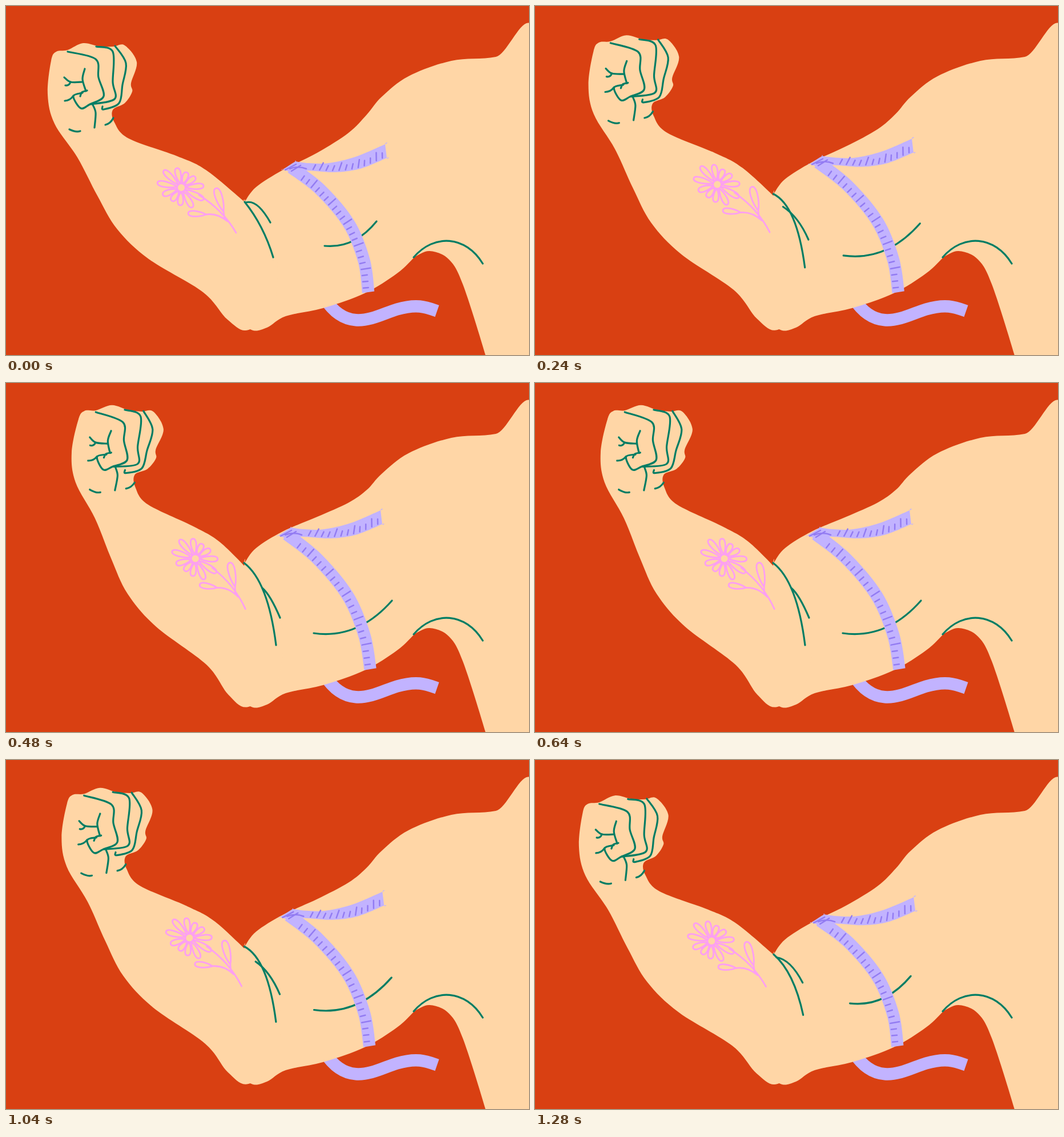
An HTML page that plays this animation: 916x611 px, repeating every 1360 ms.

```html
<!DOCTYPE html>
<html lang="en">
<head>
<meta charset="utf-8">
<title>Flexing arm</title>
<style>
  html, body { margin: 0; width: 100%; height: 100%; overflow: hidden; background: #d94012; }
  svg { display: block; width: 100%; height: 100%; }
  path, circle { fill: none; stroke-linecap: round; stroke-linejoin: round; }
  .skin { fill: #ffd6a6; }
  .tape { fill: #c2b3ff; }
  .strap { stroke: #c2b3ff; stroke-width: 21.5; stroke-linecap: butt; }
  .line { stroke: #007d64; stroke-width: 3.2; }
  .ink { stroke: #fc9ff2; stroke-width: 2.8; }
  .tick { stroke: #937cf2; stroke-width: 2.5; }
</style>
</head>
<body>
<svg id="stage" viewBox="0 0 916 611"></svg>
<script>
const stage = document.getElementById('stage');
const STEP = 80, STEPS = 17;
const RISE = 6, FALL = 11, DIP = 8, PEAK = 1.13;
const SWING = 5.7, ELBOW = '425 560';

const points = text => text.trim().split(/\s+/).map(p => p.split(',').map(Number));
const lerp = (a, b, t) => a + (b - a) * t;

function add(name, attrs, parent = stage) {
  const node = document.createElementNS('http://www.w3.org/2000/svg', name);
  for (const key in attrs) node.setAttribute(key, attrs[key]);
  return parent.appendChild(node);
}
const shape = (cls, d, parent) => add('path', { class: cls, d }, parent);

// Catmull-Rom spline; a repeated point makes a corner.
function smooth(pts, closed) {
  const n = pts.length;
  const at = i => closed ? pts[(i + n) % n] : pts[Math.max(0, Math.min(n - 1, i))];
  let d = 'M' + pts[0];
  for (let i = 0; i < (closed ? n : n - 1); i++) {
    const [a, b, c, e] = [at(i - 1), at(i), at(i + 1), at(i + 2)];
    const c1 = b.map((v, k) => v + (c[k] - a[k]) / 6);
    const c2 = c.map((v, k) => v - (e[k] - b[k]) / 6);
    d += `C${c1} ${c2} ${c}`;
  }
  return d + (closed ? 'Z' : '');
}

// Steady rise, a double pulse at the top, then an easing fall.
function flexAt(step) {
  if (step <= RISE) return step / RISE;
  if (step < FALL) return step === DIP ? 1 : PEAK;
  return (1 - (step - FALL) / (STEPS - FALL)) ** 1.3;
}

// Loose end behind the arm
shape('strap', 'M558 512C600 577 650 541 685 531S735 527 755 534');

// Torso and upper arm; the upper edge bulges with the flex
const shoulder = points('930,66 858,89 780,96 705,123 658,159');
const biceps = points('632,190 600,222 545,257 485,287 438,317 418,343 418,343');
const underside = points(`400,420 405,540 430,567 457,563 490,543 555,529 628,503 685,468
  716,439 716,439 742,429 775,443 800,487 840,612 845,640 930,640`);
const torso = shape('skin', '');
const bulge = ([x, y], p) => [x, y - 28 * p * (1 - ((x - 418) / 222) ** 3)];

// Forearm, fist and tattoo swing as one piece
const forearm = add('g', {});
shape('skin', smooth(points(`418,343 418,343 350,287 300,263 215,232 190,204 187,182
  208,170 221,150 219,135 229,98 208,69 188,71 165,71 135,65 108,77 88,80 79,96 73,155
  85,206 125,265 160,332 195,391 250,443 345,501 388,549 425,567 470,520 470,420`), true), forearm);

const fistLines = [
  '108,80 157,93 162,125 171,158 147,172 131,179 118,158 134,152',
  '142,148 133,151 130,158',
  '103,166 118,157',
  '138,110 134,128 140,149',
  '102,125 113,133 134,133',
  '104,139 113,133',
  '158,71 187,80 187,133 190,163 148,172',
  '191,70 210,100 204,138 198,170 171,181 169,176',
  '152,173 157,187 155,213',
  '188,196 174,208',
  '111,216 130,219'
];
for (const text of fistLines) {
  const pts = points(text), [a, b] = pts;
  const sagging = `M${a}Q${(a[0] + b[0]) / 2 + 2} ${(a[1] + b[1]) / 2 + 4} ${b}`;
  shape('line', pts.length > 2 ? smooth(pts) : sagging, forearm);
}

function petal(x, y, angle, length, width) {
  const d = `M0 0C${length * .3} ${width * .6} ${length} ${width} ${length} 0S${length * .3} ${-width * .6} 0 0Z`;
  shape('ink', d, forearm).setAttribute('transform', `translate(${x} ${y}) rotate(${angle})`);
}
const PETALS = 11, CORE = 7.5, heart = [307, 318];
for (let i = 0; i < PETALS; i++) {
  const deg = 28 + i * 360 / PETALS, a = deg * Math.PI / 180;
  const reach = 36 + 8 * Math.cos(2 * a - 1);
  petal(heart[0] + CORE * Math.cos(a), heart[1] + CORE * Math.sin(a), deg, reach - CORE, 8);
}
add('circle', { class: 'ink', cx: heart[0], cy: heart[1], r: CORE }, forearm);
petal(381, 360, -108, 43, 10);
petal(350, 365, 184, 31, 8);
shape('ink', 'M338 331Q380 357 403 397M350 365Q370 362 388 377M381 360L383 373', forearm);

// Creases bend from a relaxed arc to a flexed one
shape('line', 'M714 440C750 398 805 402 835 451');
const crease = (from, to, pinned) =>
  ({ from: points(from), to: points(to), pinned, node: shape('line', '') });
const creases = [
  crease('418,343 451,384 468,440', '417,315 459,347 473,459', true),
  crease('420,344 440,338 463,379', '449,359 463,371 480,411', true),
  crease('558,420 610,425 649,377', '539,438 616,449 676,381', false)
];

function bend({ from, to, pinned, node }, p) {
  const settled = 1 - (1 - p) ** 4;
  const [a, b, c] = from.map((pt, i) =>
    pt.map((v, k) => lerp(v, to[i][k], pinned && i === 0 ? p : settled)));
  node.setAttribute('d', `M${a}Q${b} ${c}`);
}

// Marks along one side of a path; len(i) is the length of the i-th mark
function marks(path, count, first, last, side, lean, len) {
  const total = path.getTotalLength();
  let d = '';
  for (let i = 0; i < count; i++) {
    const s = lerp(first, last, i / (count - 1)) * total;
    const a = path.getPointAtLength(s), b = path.getPointAtLength(s + 1);
    const angle = Math.atan2(b.y - a.y, b.x - a.x);
    const nx = -Math.sin(angle), ny = Math.cos(angle);
    const turn = angle - Math.PI / 2 + lean, size = len(i);
    const x = a.x + nx * side, y = a.y + ny * side;
    d += `M${x} ${y}l${size * Math.cos(turn)} ${size * Math.sin(turn)}`;
  }
  return d;
}

// Measuring tape: a band round the arm, a knot and a free flap
const bandPoints = points('500,283 550,321 601,382 627,446 634.5,501');
const band = shape('strap', ''), bandTicks = shape('tick', '');
const flap = add('g', {});
const knot = '485,286 485,286 507,272 507,272 530,275';
const lowerEdge = points('526,288 575,291 620,285 667,266');
shape('tape', smooth([...points(knot + ' 565,275 612,264 664,242 664,242'),
  lowerEdge[3], ...lowerEdge.slice().reverse(), ...points('505,292')], true), flap);
const hem = shape('', smooth(lowerEdge), flap);
shape('tick', marks(hem, 12, .08, .95, -3, .4, i => i % 3 === 1 ? 14 : 9), flap);
shape('tick', 'M489 287L508 277M497 285Q511 279 526 285M500 289L516 279', flap);

function draw(p) {
  forearm.setAttribute('transform', `rotate(${SWING * p} ${ELBOW})`);
  torso.setAttribute('d', smooth([...shoulder, ...biceps.map(pt => bulge(pt, p)), ...underside], true));
  creases.forEach(c => bend(c, p));
  flap.setAttribute('transform', `translate(${-8 * p} ${-19 * p})`);
  band.setAttribute('d', smooth(bandPoints.map(([x, y], i) => {
    const u = i / (bandPoints.length - 1);
    return [x + lerp(-8, 3.5, u) * p, y - 18 * (1 - u) * p];
  })));
  bandTicks.setAttribute('d', marks(band, 22, .1, .97, 8, 0, i => i % 4 === 2 ? 16 : 9));
}

const start = performance.now();
function tick() {
  draw(flexAt(Math.floor((performance.now() - start) / STEP) % STEPS));
  requestAnimationFrame(tick);
}
tick();
</script>
</body>
</html>
```
